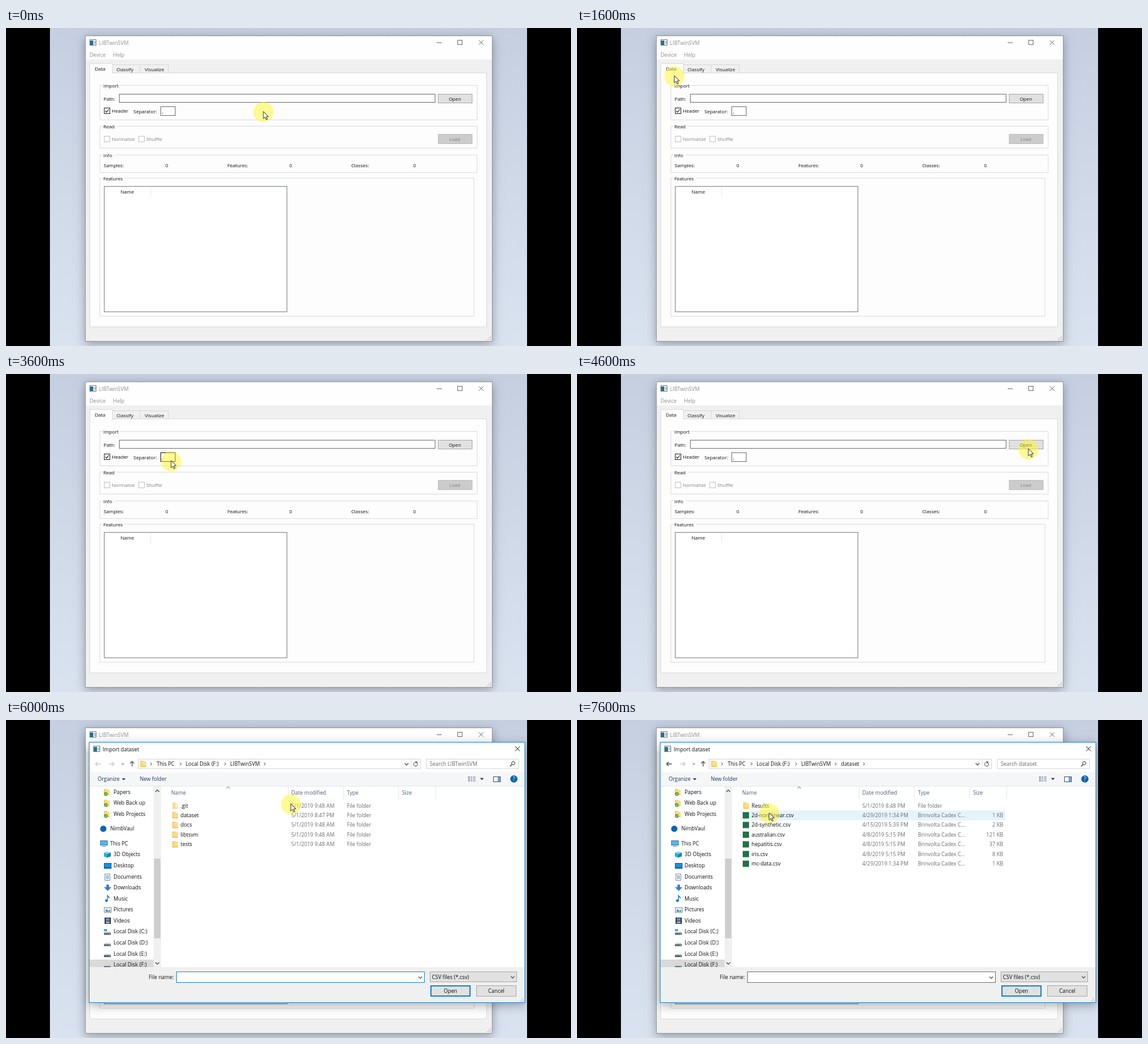
These frames come from a looping animation (900x507 px, 8000 ms). An HTML page with a canvas:

```html
<!DOCTYPE html>
<html lang="en">
<head>
<meta charset="utf-8">
<title>Import dataset</title>
<style>
  html, body { margin: 0; width: 100%; height: 100%; overflow: hidden; background: #000; }
  canvas { display: block; }
</style>
</head>
<body>
<canvas id="stage" width="900" height="507"></canvas>
<script>
const LOOP = 8000, STEP = 200;
const stage = document.getElementById('stage').getContext('2d');
const layer = document.createElement('canvas');
layer.width = 900;
layer.height = 507;
const overlay = layer.getContext('2d');
let g = stage;

const QT = 7.7, UI = 8.4;
const BLUE = '#0078d7';
const clamp = v => Math.max(0, Math.min(1, v));

function text(str, x, midY, color = '#111', size = UI, align = 'left') {
  g.font = `${size}px "Open Sans", "Noto Sans", sans-serif`;
  g.textAlign = align;
  g.fillStyle = color;
  g.fillText(str, x, midY + 3);
}
function fill(x, y, w, h, color) {
  g.fillStyle = color;
  g.fillRect(x, y, w, h);
}
function box(x, y, w, h, paint, border) {
  fill(x, y, w, h, paint);
  g.strokeStyle = border;
  g.lineWidth = 1;
  g.strokeRect(x + .5, y + .5, w - 1, h - 1);
}
function line(color, width, ...p) {
  g.strokeStyle = color;
  g.lineWidth = width;
  g.beginPath();
  for (let i = 0; i < p.length; i += 2) g.lineTo(p[i], p[i + 1]);
  g.stroke();
}
function poly(color, ...p) {
  g.fillStyle = color;
  g.beginPath();
  for (let i = 0; i < p.length; i += 2) g.lineTo(p[i], p[i + 1]);
  g.closePath();
  g.fill();
}
function disc(x, y, r, color) {
  g.fillStyle = color;
  g.beginPath();
  g.arc(x, y, r, 0, 7);
  g.fill();
}
function ring(x, y, r, color, from = 0, to = 7) {
  g.strokeStyle = color;
  g.lineWidth = 1;
  g.beginPath();
  g.arc(x, y, r, from, to);
  g.stroke();
}
const cross = (x, y, r, color) => {
  line(color, 1, x - r, y - r, x + r, y + r);
  line(color, 1, x - r, y + r, x + r, y - r);
};
const chevronDown = (x, y, r, color = '#444') => line(color, 1.1, x - r, y - r / 2, x, y + r / 2, x + r, y - r / 2);
const chevronRight = (x, y) => line('#555', 1, x - 1.2, y - 2.2, x + 1.2, y, x - 1.2, y + 2.2);

function shadowed(x, y, w, h, color) {
  g.save();
  g.shadowColor = 'rgba(0,0,0,.32)';
  g.shadowBlur = 15;
  g.shadowOffsetY = 4;
  fill(x, y, w, h, color);
  g.restore();
}
function appIcon(x, y) {
  box(x, y, 11, 10, '#f4f6f8', '#7d858c');
  fill(x + 1, y + 2, 5, 7, '#28708f');
  fill(x + 7, y + 3, 3, 4, '#b9c6cf');
}

function group(title, y, bottom, right, gap) {
  g.strokeStyle = '#dedede';
  g.lineWidth = 1;
  g.strokeRect(149.5, y + .5, right - 149, bottom - y);
  fill(153, y - 1, gap, 3, '#fdfdfd');
  text(title, 155, y + 1, '#111', QT);
}
function checkbox(x, y, label, on) {
  box(x, y, 10, 10, '#fff', on ? '#333' : '#c6c6c6');
  if (on) line('#222', 1.1, x + 2, y + 5, x + 4, y + 7.3, x + 8, y + 2.5);
  text(label, x + 12.5, y + 5, on ? '#111' : '#838383', QT);
}

function drawDesktop() {
  fill(0, 0, 900, 507, '#000');
  const sky = g.createLinearGradient(0, 0, 0, 507);
  sky.addColorStop(0, '#c5cfe0');
  sky.addColorStop(1, '#d9e3f0');
  fill(70, 0, 760, 507, sky);
}

function drawWindow(t) {
  const active = t >= 5200 && t < 5800;
  shadowed(126, 12, 649, 488, '#f0f0f0');
  box(126, 12, 649, 488, '#f0f0f0', '#979ca3');
  fill(127, 13, 647, 37, '#fefefe');
  appIcon(133, 18);
  text('LIBTwinSVM', 148, 23.5, active && t < 5600 ? '#111' : '#8f8f8f');
  const menu = active ? '#111' : '#8f8f8f';
  text('Device', 133, 43, menu);
  text('Help', 170.5, 43, menu);
  line('#777', 1, 686, 23.5, 694, 23.5);
  g.strokeRect(719.5, 19.5, 7, 7);
  cross(757, 23.2, 3.7, '#777');

  box(133, 71, 633, 406, '#fdfdfd', '#dcdcdc');
  box(169, 58, 45, 14, '#f0f0f0', '#dadada');
  box(213, 58, 46, 14, '#f0f0f0', '#dadada');
  box(133, 56, 37, 17, '#fdfdfd', '#dcdcdc');
  fill(134, 71, 35, 3, '#fdfdfd');
  text('Data', 141.5, 65, '#111', QT);
  text('Classify', 176, 65.5, '#111', QT);
  text('Visualize', 221, 65.5, '#111', QT);

  group('Import', 91, 146, 750, 28);
  group('Read', 156, 191, 750, 23);
  group('Info', 202, 230, 750, 20);
  group('Features', 239, 459, 745, 36);

  text('Path:', 155.5, 112.5, '#111', QT);
  box(180, 105, 504, 14, '#fff', t === 4200 || t === 4400 ? '#222' : '#777');
  const hover = t >= 4800, pressed = t >= 5200;
  box(688, 105, 55, 15, pressed ? '#cfe5f7' : hover ? '#e5f1fb' : '#e1e1e1', hover ? '#3c8fd2' : '#adadad');
  text('Open', 715, 112.5, '#111', QT, 'center');
  checkbox(156, 127, 'Header', true);
  text('Separator:', 203, 132.5, '#111', QT);
  box(246, 125, 24, 15, '#fff', t >= 3600 && t < 4000 ? '#222' : '#777');
  text(',', 248.5, 132.5, '#111', QT);

  checkbox(156, 172, 'Normalize', false);
  checkbox(211, 172, 'Shuffle', false);
  box(688, 169, 55, 16, '#cccccc', '#bfbfbf');
  text('Load', 715, 177, '#838383', QT, 'center');

  ['Samples:', 'Features:', 'Classes:'].forEach((label, i) => {
    text(label, 155.5 + 197.2 * i, 219, '#111', QT);
    text('0', 254 + 197.2 * i, 219, '#111', QT);
  });

  box(156, 252, 292, 201, '#fff', '#828790');
  text('Name', 182.5, 261, '#111', QT);
  line('#e8e8e8', 1, 230.5, 253, 230.5, 269);
  for (let r = 0; r < 3; r++)
    for (let c = 0; c <= r; c++) fill(771 - c * 2.5, 491 + r * 2.5, 1.3, 1.3, '#b4b4b4');
}

function folder(x, y, faint) {
  g.globalAlpha = faint ? .5 : 1;
  fill(x, y - 5, 5, 10, '#e8bf5b');
  fill(x + 1, y - 4, 8, 9, '#ffdc82');
  fill(x + 1, y + 3, 8, 2, '#f3cb68');
  g.globalAlpha = 1;
}
function syncedFolder(x, y) {
  folder(x, y);
  disc(x + 3, y + 3, 3, '#4aa531');
  line('#fff', .9, x + 1.5, y + 3, x + 2.6, y + 4.2, x + 4.5, y + 1.8);
}
function drive(x, y) {
  poly('#c9cdd1', x + 1, y, x + 10, y, x + 11, y + 2, x, y + 2);
  fill(x, y + 2, 11, 3, '#59616a');
  fill(x + 8, y + 3, 2, 1, '#6fe07c');
}
const icons = {
  synced: syncedFolder,
  cloud: (x, y) => disc(x + 5, y, 5, '#0a64b4'),
  pc(x, y) {
    box(x, y - 5, 12, 8, '#58b5ea', '#3d7ea8');
    fill(x + 3, y + 4, 6, 1, '#6a7f8f');
  },
  cube(x, y) {
    poly('#7fdcf0', x, y - 3, x + 5, y - 5, x + 11, y - 3, x + 5, y - 1);
    poly('#2aaed0', x, y - 3, x + 5, y - 1, x + 5, y + 5, x, y + 3);
    poly('#1789ad', x + 5, y - 1, x + 11, y - 3, x + 11, y + 3, x + 5, y + 5);
  },
  desk(x, y) {
    box(x, y - 4, 12, 9, '#1b8fe0', '#0c62a8');
    fill(x + 1, y + 3, 10, 1, '#0b5c9c');
  },
  page(x, y) {
    box(x + 1, y - 5, 9, 11, '#fff', '#8795a1');
    for (let i = 0; i < 3; i++) fill(x + 3, y - 2 + i * 2, 5, 1, '#4d94c8');
  },
  down(x, y) {
    fill(x + 4, y - 5, 4, 5, '#2d7fd3');
    poly('#2d7fd3', x, y - 1, x + 12, y - 1, x + 6, y + 5);
  },
  note(x, y) {
    disc(x + 4, y + 3, 2.2, '#1683d8');
    line('#1683d8', 1.4, x + 5.6, y + 3, x + 5.6, y - 5, x + 9, y - 1);
  },
  picture(x, y) {
    box(x, y - 4, 12, 9, '#e9f4fb', '#8795a1');
    poly('#3c83a8', x + 2, y + 3, x + 4, y - 1, x + 7, y + 2, x + 10, y, x + 10, y + 3);
  },
  film(x, y) {
    fill(x + 1, y - 5, 10, 10, '#333a42');
    fill(x + 3, y - 4, 6, 4, '#668fc0');
    fill(x + 3, y + 1, 6, 3, '#9aaec4');
  },
  system(x, y) {
    drive(x, y);
    fill(x, y - 4, 5, 3, '#22a3e0');
  },
  drive
};

const navigation = [
  ['Papers', 115, 'synced'], ['Web Back up', 132.5, 'synced'], ['Web Projects', 150, 'synced'],
  ['NimbVaul', 173.5, 'cloud'], ['This PC', 197, 'pc'],
  ['3D Objects', 214.5, 'cube'], ['Desktop', 232, 'desk'], ['Documents', 250, 'page'],
  ['Downloads', 267.5, 'down'], ['Music', 285, 'note'], ['Pictures', 302.5, 'picture'],
  ['Videos', 320, 'film'], ['Local Disk (C:)', 337.5, 'system'], ['Local Disk (D:)', 355.5, 'drive'],
  ['Local Disk (E:)', 373, 'drive'], ['Local Disk (F:)', 390.5, 'drive']
];
const FOLDER = 'File folder', SHEET = 'Brinvolta Cadex C...', MORNING = '5/1/2019 9:48 AM';
const projectRows = [
  ['.git', MORNING, FOLDER], ['dataset', '5/1/2019 8:47 PM', FOLDER], ['docs', MORNING, FOLDER],
  ['libtsvm', MORNING, FOLDER], ['tests', MORNING, FOLDER]
];
const datasetRows = [
  ['Results', '5/1/2019 8:48 PM', FOLDER],
  ['2d-non-linear.csv', '4/29/2019 1:34 PM', SHEET, '1 KB'],
  ['2d-synthetic.csv', '4/15/2019 5:39 PM', SHEET, '2 KB'],
  ['australian.csv', '4/8/2019 5:15 PM', SHEET, '121 KB'],
  ['hepatitis.csv', '4/8/2019 5:15 PM', SHEET, '37 KB'],
  ['iris.csv', '4/8/2019 5:15 PM', SHEET, '8 KB'],
  ['mc-data.csv', '4/29/2019 1:34 PM', SHEET, '1 KB']
];

function arrow(x, y, dir, color) {
  line(color, 1.2, x - 4 * dir, y, x + 4 * dir, y);
  line(color, 1.2, x + 1 * dir, y - 3.2, x + 4.2 * dir, y, x + 1 * dir, y + 3.2);
}

function drawAddressBar(opened) {
  arrow(147, 70, -1, opened ? '#333' : '#c4c4c4');
  arrow(168, 70, 1, '#c4c4c4');
  chevronDown(186, 70, 1.8, '#888');
  line('#444', 1.2, 201, 74, 201, 66);
  line('#444', 1.2, 197.8, 69.2, 201, 66, 204.2, 69.2);
  box(210, 62, 451, 16, '#fff', '#d9d9d9');
  folder(214, 70);
  [231, 278, 349, 412].forEach(x => chevronRight(x, 70));
  text('This PC', 240, 69.5);
  text('Local Disk (F:)', 286, 69.5);
  text('LIBTwinSVM', 357, 69.5);
  if (opened) {
    text('dataset', 420.5, 69.5);
    chevronRight(457, 70);
  }
  chevronDown(638, 70.5, 3);
  line('#e2e2e2', 1, 645.5, 63, 645.5, 77);
  ring(652.5, 70.5, 3.2, '#555', -.6, 4.8);
  poly('#555', 652, 65.5, 656, 67, 653, 69.5);
  box(669, 62, 148, 16, '#fff', '#d9d9d9');
  text(opened ? 'Search dataset' : 'Search LIBTwinSVM', 675, 69.5, '#6a6a6a');
  ring(808, 68.8, 2.6, '#444');
  line('#444', 1.3, 806, 70.8, 803, 74);
}

function drawToolbar() {
  fill(133, 83, 693, 22, '#f5f6f7');
  line('#e6e8ea', 1, 133, 105.5, 826, 105.5);
  text('Organize', 146, 94, '#1e395b');
  poly('#1e395b', 184.5, 93, 190.5, 93, 187.5, 96);
  text('New folder', 213, 94, '#1e395b');
  for (let i = 0; i < 3; i++) {
    fill(736, 90 + i * 3, 3, 2, '#8a98a8');
    fill(740, 90 + i * 3, 3, 2, '#a9b4c0');
    fill(744, 90 + i * 3, 4, 2, '#a9b4c0');
  }
  poly('#1e395b', 755, 92.5, 761, 92.5, 758, 95.8);
  box(776, 90, 12, 9, '#fff', '#4a6076');
  fill(783, 91, 4, 7, '#69a8df');
  disc(809, 94, 5.8, '#0a66b0');
  text('?', 809, 94, '#fff', UI, 'center');
}

function drawNavigation() {
  g.save();
  g.beginPath();
  g.rect(133, 106, 102, 288);
  g.clip();
  fill(133, 382, 102, 17, '#d9d9d9');
  for (const [label, y, icon] of navigation) {
    const root = icon === 'cloud' || icon === 'pc';
    icons[icon](root ? 150 : 156, y);
    text(label, root ? 166 : 171.3, y - .3);
  }
  g.restore();
  fill(235, 106, 12, 288, '#f0f0f0');
  fill(236, 221, 10, 127, '#cdcdcd');
  line('#444', 1.2, 238, 114.5, 241, 111.5, 244, 114.5);
  chevronDown(241, 388, 3);
}

function drawFiles(t, opened) {
  const heads = [['Name', 263], ['Date modified', 454.5], ['Type', 543], ['Size', 631]];
  heads.forEach(([label, x]) => text(label, x, 115.5, '#4c607a'));
  [449, 537, 625, 684].forEach(x => line('#e8e8e8', 1, x + .5, 106, x + .5, 126));
  line('#777', 1, 351, 109, 354, 106.5, 357, 109);
  if (t >= 6200) fill(260, 144, 422, 16, !opened && t >= 7000 ? '#cce8ff' : '#e5f3fd');
  (opened ? datasetRows : projectRows).forEach(([name, date, kind, size], i) => {
    const y = 136.5 + i * 15.45;
    if (kind === FOLDER) folder(265, y, name === '.git');
    else fill(264, y - 5, 10, 10, '#1f7244');
    text(name, 278, y);
    text(date, 454.5, y, '#6d6d6d');
    text(kind, 543, y, '#6d6d6d');
    if (size) text(size, 679, y, '#6d6d6d', UI, 'right');
  });
}

function drawFooter(t) {
  fill(133, 394, 693, 56, '#f0f0f0');
  text('File name:', 267.5, 410, '#111', UI, 'right');
  box(271, 401, 396, 18, '#fff', t < 7600 ? '#2b8ad8' : '#7a7a7a');
  chevronDown(660, 410.5, 2.8);
  box(675, 401, 139, 17, '#e1e1e1', '#adadad');
  text('CSV files (*.csv)', 678.5, 409.5);
  chevronDown(807, 410, 2.8);
  box(676, 423, 64, 18, '#e1e1e1', BLUE);
  g.strokeRect(677.2, 424.2, 61.6, 15.6);
  text('Open', 708, 431.5, '#111', UI, 'center');
  box(749, 423, 64, 18, '#e1e1e1', '#adadad');
  text('Cancel', 781, 431.5, '#111', UI, 'center');
  for (let r = 0; r < 3; r++)
    for (let c = 0; c <= r; c++) fill(823 - c * 2.3, 443 + r * 2.3, 1.2, 1.2, '#b4b4b4');
}

function drawTooltip(t) {
  if (t >= 7200) return;
  g.globalAlpha = clamp((t - 6300) / 430);
  fill(312, 206, 232, 3, 'rgba(0,0,0,.25)');
  fill(543, 163, 2, 43, 'rgba(0,0,0,.25)');
  box(308, 159, 235, 48, '#fff', '#767676');
  ['Date created: 5/1/2019 9:48 AM', 'Size: 176 KB', 'Folders: Results',
    'Files: 2d-non-linear.csv, 2d-synthetic.csv, australian.csv, ...'
  ].forEach((row, i) => text(row, 312, 166.3 + i * 10.9, '#575757'));
  g.globalAlpha = 1;
}

function drawDialog(t) {
  const p = clamp((t - 5580) / 250);
  if (!p) return;
  const opened = t >= 7200;
  g = overlay;
  g.clearRect(0, 0, 900, 507);
  shadowed(132, 35, 695, 416, '#fff');
  box(132, 35, 695, 416, '#fff', '#2b8ad2');
  appIcon(139, 41);
  text('Import dataset', 154, 46.5);
  cross(814.8, 45.8, 3.7, '#222');
  drawAddressBar(opened);
  drawToolbar();
  drawNavigation();
  drawFiles(t, opened);
  drawFooter(t);
  g = stage;
  const scale = .95 + .05 * p;
  g.save();
  g.globalAlpha = p;
  g.translate(479.5, 243);
  g.scale(scale, scale);
  g.drawImage(layer, -479.5, -243);
  g.restore();
  drawTooltip(t);
}

const route = [
  [0, 410, 134], [600, 410, 134], [1600, 155, 77], [1800, 155, 76], [2200, 155, 76],
  [2800, 177, 147], [3400, 263, 139], [3800, 263, 139], [4600, 719, 120], [5000, 722, 111.5],
  [5700, 722, 111.5], [6200, 308, 147], [7200, 308, 147], [7600, 306, 149], [8000, 306, 149]
];
function pointerAt(t) {
  const i = route.findIndex(stop => stop[0] > t);
  const [t0, x0, y0] = route[i - 1], [t1, x1, y1] = route[i];
  const u = (t - t0) / (t1 - t0), e = u * u * (3 - 2 * u);
  return [x0 + (x1 - x0) * e, y0 + (y1 - y0) * e];
}
function drawPointer(t) {
  const [x, y] = pointerAt(t);
  disc(x, y, 16, 'rgba(255,246,40,.5)');
  g.save();
  g.translate(x, y - 1);
  poly('#fff', 0, 0, 0, 11.5, 2.7, 9, 4.6, 13.2, 6.4, 12.4, 4.5, 8.3, 8, 8.2);
  g.strokeStyle = '#222';
  g.lineWidth = .9;
  g.stroke();
  g.restore();
}

function frame(now) {
  const t = Math.floor((now % LOOP) / STEP) * STEP;
  drawDesktop();
  drawWindow(t);
  drawDialog(t);
  drawPointer(t);
  requestAnimationFrame(frame);
}
requestAnimationFrame(frame);
</script>
</body>
</html>
```
